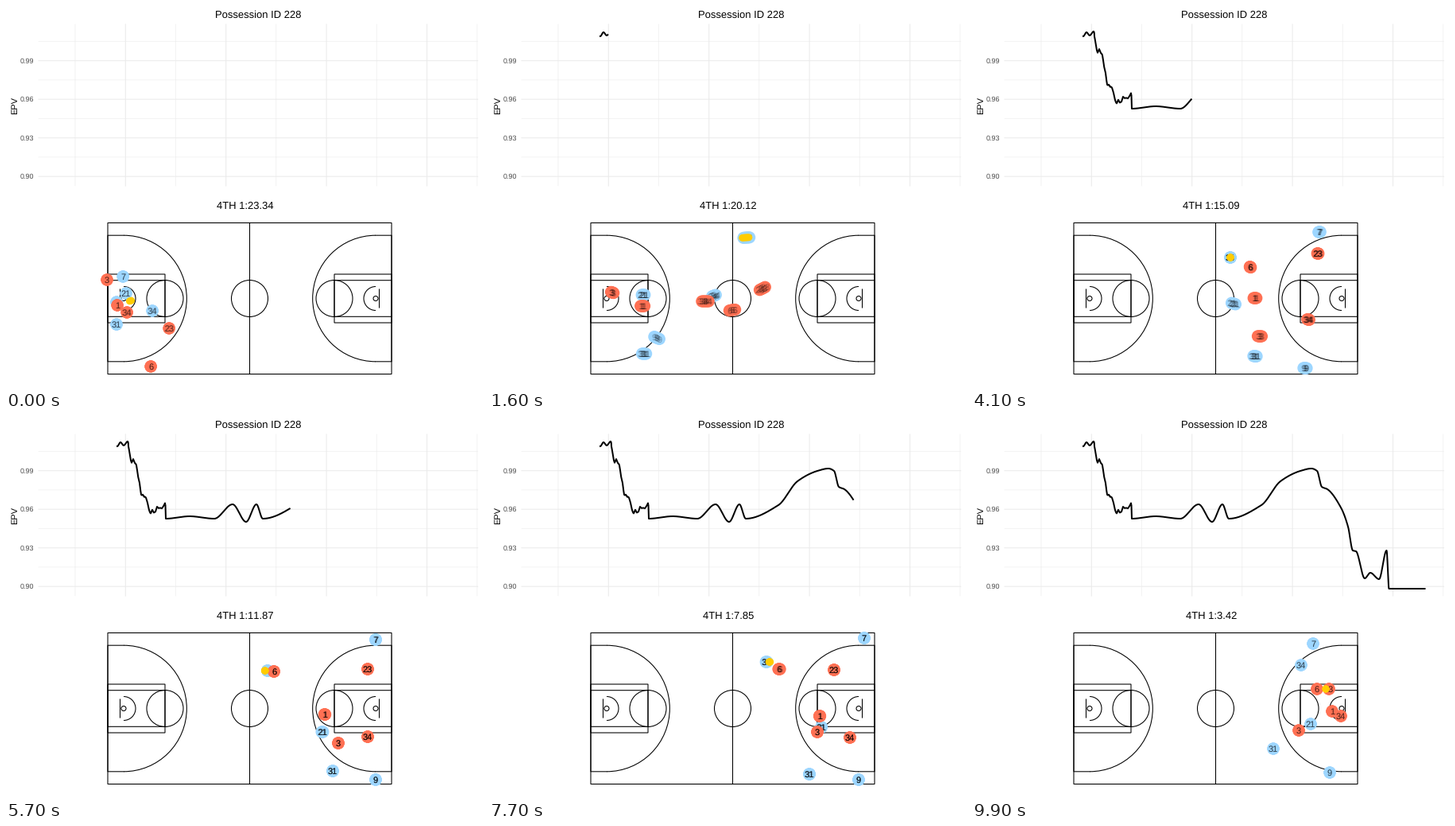
A matplotlib script for the animation above (10000 ms loop, 600x480 px).

```python
import matplotlib.pyplot as plt
import numpy as np
from matplotlib.animation import FuncAnimation
from matplotlib.collections import EllipseCollection
from matplotlib.patches import Arc, Circle, Rectangle

W, H, DPI = 600, 480, 80
PT = 72 / DPI  # points per pixel
FRAMES = 100
RED, BLUE, GOLD = "#FF7053", "#9DD6FF", "#FFCC00"
TRAIL = np.linspace(-0.5, 0.5, 6)  # samples drawn in each frame
KEY_TIMES = (0, 16, 28, 41, 57, 77, 99)
HOOP = np.array((465, 367.5))

plt.rcParams.update({"font.family": "Liberation Sans", "text.hinting": "none",
                     "text.hinting_factor": 1})
fig = plt.figure(figsize=(W / DPI, H / DPI), dpi=DPI, facecolor="white")
ax = fig.add_axes([0, 0, 1, 1])
ax.set(xlim=(0, W), ylim=(H, 0))
ax.axis("off")


def line(xs, ys, color="black", width=1.07, z=1):
    return ax.plot(xs, ys, color=color, lw=width * PT, zorder=z, snap=False)[0]


def text(x, y, s, size, **kw):
    kw = {"ha": "center", "va": "baseline", **kw}
    return ax.text(x, y, s, fontsize=size * PT, **kw)


def dots(color, radius, z):
    d = np.full(len(TRAIL), 2 * radius)
    return ax.add_collection(EllipseCollection(
        d, d, 0 * d, units="x", offsets=np.zeros((len(d), 2)), zorder=z,
        offset_transform=ax.transData, facecolor=color, edgecolor="none"))


def smooth(kt, kv, t):
    """Cubic through the keys that never overshoots and rests at both ends."""
    kt, kv = np.asarray(kt, float), np.asarray(kv, float)
    h = np.diff(kt)
    s = np.diff(kv) / h
    a, b = s[:-1], s[1:]
    m = np.zeros_like(kv)
    m[1:-1] = np.divide(2 * a * b, a + b, out=np.zeros_like(a), where=a * b > 0)
    i = np.clip(np.searchsorted(kt, t, "right") - 1, 0, len(h) - 1)
    u = np.clip((t - kt[i]) / h[i], 0, 1)
    return ((1 + 2 * u) * (1 - u) ** 2 * kv[i] + u * (1 - u) ** 2 * h[i] * m[i]
            + u * u * (3 - 2 * u) * kv[i + 1] - u * u * (1 - u) * h[i] * m[i + 1])


# ---- chart ----
def draw_chart():
    left, right, top, bottom = 41, 593.5, 23, 226
    for width, x0, count, y0 in ((0.6, 87, 5, 44.4), (1.07, 150.3, 4, 68.7)):
        for x in x0 + 126.4 * np.arange(count):
            line((x, x), (top, bottom), "#EBEBEB", width, 0)
        for y in y0 + 48.5 * np.arange(4):
            line((left, right), (y, y), "#EBEBEB", width, 0)
    for k in range(4):
        text(35.5, 71.9 + 48.5 * k, f"{0.99 - 0.03 * k:.2f}", 8.8, ha="right",
             color="#4D4D4D")
    text(317.2, 15, "Possession ID 228", 13.2)
    text(11, 124.5, "EPV", 11, rotation=90, va="center")


def epv_curve():
    start = [(140, 38), (144, 33), (148, 37), (153, 32), (157, 54), (163, 60),
             (171, 98), (174, 99), (182, 119), (200.5, 112), (201, 129)]
    rest = [(231, 126), (262, 129), (285, 111), (302, 133), (315, 111), (323, 129),
            (364, 112), (388, 82), (413, 69), (427, 66), (434, 69), (440, 89),
            (447, 92), (464, 115), (473, 139), (479, 169), (483, 170), (494, 204),
            (501, 197), (512, 205), (521.5, 169), (524.5, 217), (570, 217)]
    kx, ky = zip(*start, *rest)
    x = np.arange(140, 570, 0.25)
    knots = np.arange(154, 201, 2)
    jitter = np.random.default_rng(4).uniform(-3.5, 3.5, len(knots))
    return x, smooth(kx, ky, x) + np.interp(x, knots, jitter, 0, 0)


# ---- court ----
def draw_court():
    cx, cy = 306.5, 367.5
    base, free_throw, ring = 178.5, 106.5, 158.5  # distances from midcourt

    def shape(cls, *args, **kw):
        ax.add_patch(cls(*args, fill=False, ec="black", lw=1.07 * PT, zorder=1,
                         snap=False, **kw))

    shape(Rectangle, (cx - base, 272.5), 2 * base, 190)
    line((cx, cx), (272.5, 462.5))
    shape(Circle, (cx, cy), 23)
    for side in (-1, 1):
        def at(d):
            return cx + side * d

        for half in (30.5, 22.8):
            shape(Rectangle, (at(base), cy - half), side * (free_throw - base), 2 * half)
        shape(Circle, (at(free_throw), cy), 23)
        turn = 90 * side
        for r in (15, 79.3):
            shape(Arc, (at(ring), cy), 2 * r, 2 * r, theta1=turn, theta2=turn + 180)
        line((at(ring), at(base), at(base), at(ring)),
             (cy - 79.3, cy - 79.3, cy + 79.3, cy + 79.3))
        line((at(163), at(163)), (cy - 11.5, cy + 11.5))
        shape(Circle, (at(ring), cy), 3)


# ---- motion ----
class Player:
    def __init__(self, number, color, *spots):
        z = 2 if color == BLUE else 4
        self.xs, self.ys = zip(*spots)
        self.dots = dots(color, 7.6, z)
        self.labels = [text(0, 0, number, 11.2, alpha=0.3, zorder=z + 1) for _ in TRAIL]

    def at(self, t):
        return np.column_stack([smooth(KEY_TIMES, v, t) for v in (self.xs, self.ys)])

    def move(self, t):
        spots = self.at(t)
        self.dots.set_offsets(spots)
        for k, label in enumerate(self.labels):
            label.set_visible(k < len(spots))
            if k < len(spots):
                label.set_position(spots[k] + (0, 4))


draw_chart()
draw_court()

blues = [
    Player("7", BLUE, (147, 340), (324, 291), (390, 288), (437, 284), (465, 281),
           (472, 279), (429, 286)),
    Player("21", BLUE, (151, 361), (194, 363), (256, 350), (329, 374), (398, 397),
           (418, 391), (426, 387)),
    Player("31", BLUE, (139, 400), (195, 437), (291, 436), (356, 440), (411, 446),
           (403, 450), (379, 418)),
    Player("34", BLUE, (184, 383), (283, 364), (325, 328), (325, 316), (329, 320),
           (349, 309), (414, 313)),
    Player("9", BLUE, (139, 372), (211, 417), (335, 450), (419, 455), (465, 457),
           (465, 457), (450, 448)),
]
reds = [
    Player("23", RED, (205, 405), (344, 355), (409, 310), (435, 311), (455, 318),
           (434, 319), (449, 343)),
    Player("6", RED, (182, 453), (306, 382), (383, 375), (350, 328), (337, 321),
           (365, 318), (434, 343)),
    Player("1", RED, (140, 376), (193, 377), (293, 374), (356, 367), (401, 375),
           (416, 377), (453, 371)),
    Player("3", RED, (127, 344), (155, 360), (259, 377), (362, 415), (418, 411),
           (413, 397), (411, 395)),
    Player("34", RED, (152, 385), (272, 371), (379, 384), (423, 394), (455, 403),
           (454, 404), (464, 377)),
]
guard, wing, inbounder, rebounder = blues[0], blues[3], blues[4], reds[0]


def dribble(player):
    def at(t):
        swing = -4 * np.sin(2 * np.pi * (t - 41) / 46)
        return player.at(t) + np.column_stack([swing, 0 * t])
    return at


# who has the ball: from, until, where; passes fly straight in between
HOLDS = [
    (-1, 0, lambda t: np.tile((158, 370), (len(t), 1))),
    (3, 5, inbounder.at),
    (9, 25.5, dribble(guard)),
    (30, 89, dribble(wing)),
    (95, 95.5, lambda t: np.tile(HOOP, (len(t), 1))),
    (98, FRAMES, dribble(rebounder)),
]


def ball_at(t):
    spots = HOLDS[0][2](t).astype(float)
    for (_, left, giver), (caught, _, taker) in zip(HOLDS, HOLDS[1:]):
        u = np.clip((t - left) / (caught - left), 0, 1)[:, None]
        pair = (1 - u) * giver(np.minimum(t, left)) + u * taker(np.maximum(t, caught))
        spots = np.where((t > left)[:, None], pair, spots)
    for start, end, where in HOLDS:
        spots = np.where(((t >= start) & (t <= end))[:, None], where(t), spots)
    return spots


ball = dots(GOLD, 4.5, 6)
epv_x, epv_y = epv_curve()
curve = line([], [], width=2, z=2)
clock = text(301, 255, "", 13.2)


def draw(i):
    t = i + TRAIL
    t = t[(t >= 0) & (t <= FRAMES - 1)]
    for p in blues + reds:
        p.move(t)
    ball.set_offsets(ball_at(t))
    drawn = epv_x <= 68.3 + 5.064 * i
    curve.set_data(epv_x[drawn], epv_y[drawn])
    clock.set_text(f"4TH 1:{round(23.34 - 0.2012 * i, 2):g}")
    return []


anim = FuncAnimation(fig, draw, frames=FRAMES, init_func=lambda: draw(0),
                     interval=100, repeat=True, repeat_delay=0)
plt.show()
```
